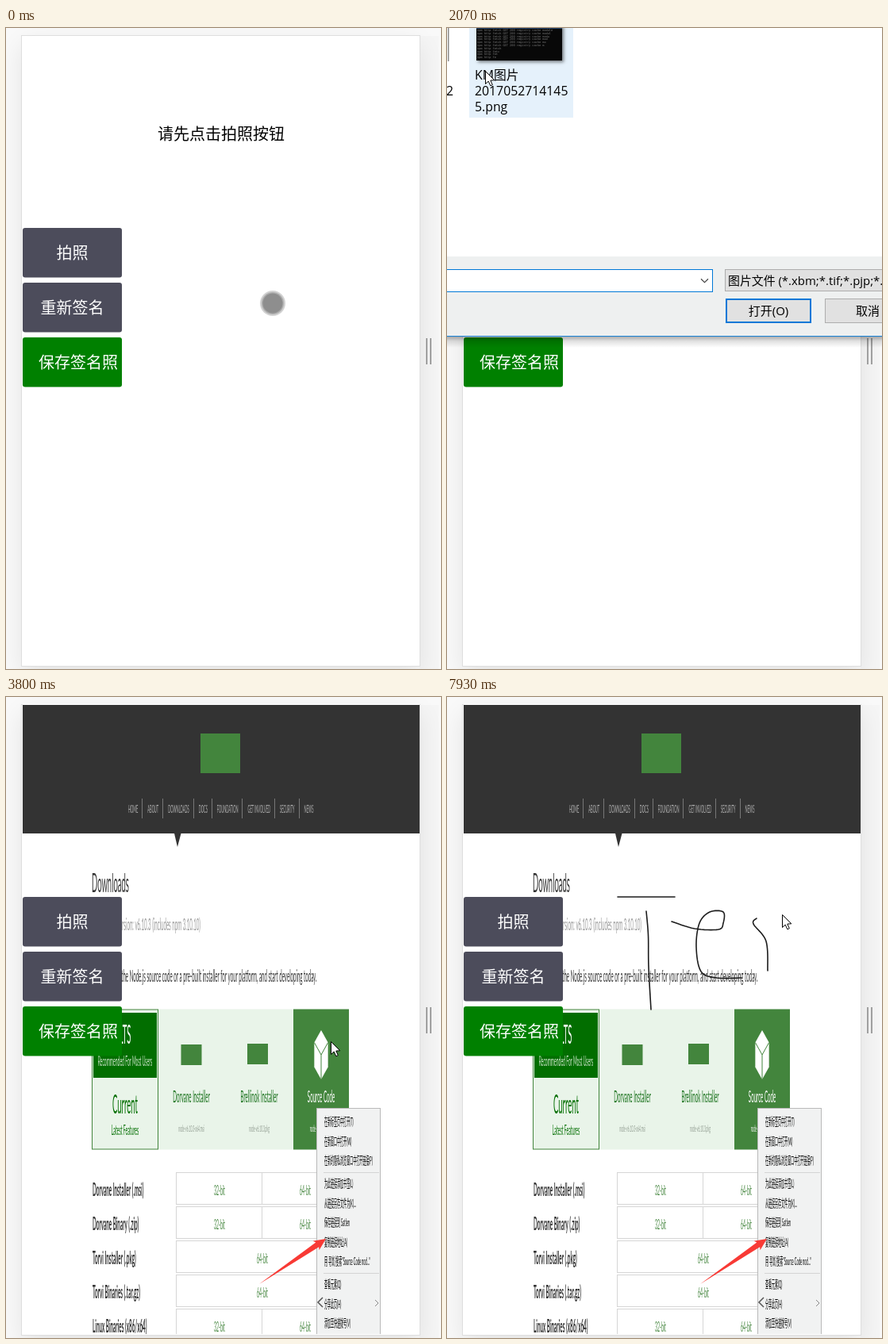
An HTML page with a canvas that plays this animation: 548 by 808 pixels, repeating every 8 s.

```html
<!DOCTYPE html>
<html lang="zh">
<head>
<meta charset="utf-8">
<title>签名照</title>
<style>
  html, body { margin: 0; width: 100%; height: 100%; overflow: hidden; background: #f9f9f9; }
  canvas { display: block; }
</style>
</head>
<body>
<canvas id="stage" width="548" height="808"></canvas>
<script>
const ctx = document.getElementById('stage').getContext('2d');
const LOOP = 8000;
const SQUEEZE = 0.287; // the chosen picture is squeezed sideways to fit the phone
const UI = '"Open Sans", "Noto Sans CJK SC", "Noto Sans CJK", sans-serif';
const CJK = '"Noto Sans CJK SC", "Noto Sans CJK", sans-serif';
const WEB = 'Lato, "Noto Sans CJK SC", "Noto Sans CJK", sans-serif';
const GREEN = '#43853d', DEEP = '#026e00', DARK = '#333333', PALE = '#e9f4e9', BLUE = '#0078d7';

// Every path starts where the one before it ended; pen paths leave ink.
const paths = [];
function glide(from, to, ...points) {
  const prev = paths[paths.length - 1];
  if (prev) points.unshift(prev.points[prev.points.length - 1]);
  paths.push({ from, to, points });
}
function write(from, to, ...points) {
  paths.push({ from, to, points, pen: true });
}

glide(0, 470, [336, 347], [63, 287]);
glide(530, 930, [290, 369]);
glide(1400, 2070, [48, 54]);
glide(2070, 2200, [-14, 40]);
glide(2730, 3450, [375, 352]);
glide(3600, 3830, [412, 442]);
glide(4130, 4470, [215, 252]);
write(4530, 4930, [215, 252], [287, 252]);
glide(4930, 5130, [251, 270]);
write(5200, 5600, [251, 270], [253.5, 300], [254, 340], [257, 394]);
glide(5600, 5800, [283, 283]);
write(6000, 6800, [283, 283], [312, 292], [342, 293], [348, 285], [348, 271], [331, 271],
  [318, 285], [314, 315], [320, 346], [340, 354], [371, 354]);
glide(6800, 7000, [390, 279]);
write(7200, 7600, [390, 279], [386, 286], [402, 308], [404, 345]);
glide(7600, 7930, [422, 274]);

function spline(a, b, c, d, u) {
  return b + 0.5 * u * (c - a + u * (2 * a - 5 * b + 4 * c - d + u * (3 * (b - c) + d - a)));
}

function along({ from, to, points }, t) {
  const last = points.length - 1;
  const s = Math.min(Math.max((t - from) / (to - from), 0), 1) * last;
  const i = Math.min(Math.floor(s), last - 1);
  const near = k => points[Math.min(Math.max(i + k, 0), last)];
  return [0, 1].map(k => spline(near(-1)[k], near(0)[k], near(1)[k], near(2)[k], s - i));
}

function pointer(t) {
  const begun = paths.filter(path => path.from <= t);
  return along(begun[begun.length - 1], t);
}

function box(x, y, w, h, fill, line, weight = 1) {
  ctx.fillStyle = line || fill;
  ctx.fillRect(x, y, w, h);
  if (!line) return;
  ctx.fillStyle = fill;
  ctx.fillRect(x + weight, y + weight, w - 2 * weight, h - 2 * weight);
}

function square(cx, cy, side, color) {
  box(cx - side / 2, cy - side / 2, side, side, color);
}

function text(str, x, y, size, color, align = 'left', family = UI) {
  ctx.font = size + 'px ' + family;
  ctx.fillStyle = color;
  ctx.textAlign = align;
  ctx.fillText(str, x, y);
}

// Returns the drawn width.
function webText(str, x, y, size, color, align = 'left', weight = '') {
  ctx.save();
  ctx.translate(x, y);
  ctx.scale(SQUEEZE, 1);
  ctx.font = `${weight} ${size}px ${WEB}`;
  ctx.fillStyle = color;
  ctx.textAlign = align;
  ctx.fillText(str, 0, 0);
  const width = ctx.measureText(str).width * SQUEEZE;
  ctx.restore();
  return width;
}

function trace(points) {
  ctx.beginPath();
  points.forEach(([x, y]) => ctx.lineTo(x, y));
}

function poly(points, fill) {
  trace(points);
  ctx.closePath();
  ctx.fillStyle = fill;
  ctx.fill();
}

function line(points, color, width) {
  trace(points);
  ctx.strokeStyle = color;
  ctx.lineWidth = width;
  ctx.stroke();
}

function chevron(x, y, size, turn, color, width) {
  ctx.save();
  ctx.translate(x, y);
  ctx.rotate(turn);
  line([[-size, -size / 2], [0, size / 2], [size, -size / 2]], color, width);
  ctx.restore();
}

function drawFrame() {
  box(0, 0, 548, 808, '#f9f9f9');
  ctx.save();
  ctx.shadowColor = 'rgba(0,0,0,.09)';
  ctx.shadowBlur = 30;
  ctx.shadowOffsetY = 12;
  box(20, 9, 501, 795, '#fff');
  ctx.restore();
  box(521, 10, 24, 798, 'rgba(0,0,0,.015)');
  box(19, 9, 503, 796, '#fff', '#dedede');
  box(529, 391, 2, 33, '#a0a0a0');
  box(534, 391, 2, 33, '#a0a0a0');
}

function drawButtons() {
  ['拍照', '重新签名', '保存签名照'].forEach((label, i) => {
    const y = 252 + 69 * i, save = i === 2;
    ctx.fillStyle = save ? '#008000' : '#4c4c5b';
    ctx.beginPath();
    ctx.roundRect(21, y, 125, 62.5, 3);
    ctx.fill();
    text(label, save ? 91 : 83.5, y + 39, 20, '#fff', 'center', CJK);
  });
}

function drawNav() {
  box(21, 10, 500, 162, DARK);
  poly([[212, 172], [220.5, 172], [216, 189]], DARK);
  square(270, 71, 50, GREEN);
  let x = 154;
  for (const label of 'HOME,ABOUT,DOWNLOADS,DOCS,FOUNDATION,GET INVOLVED,SECURITY,NEWS'.split(',')) {
    if (x > 154) box(Math.round(x - 7), 128, 1, 25, '#777');
    x += webText(label, x, 146, 14, '#b4b4b4') + 12;
  }
}

function drawTile(x, name, file, ink, note) {
  webText(name, x, 511, 21.5, ink, 'center');
  webText(file, x, 548, 11.7, note, 'center');
}

function drawTiles() {
  box(108, 393.5, 84, 177, PALE, GREEN);
  box(110, 398, 80, 82, DEEP);
  box(192, 393.5, 170, 177, PALE);
  box(362, 393.5, 70, 177, GREEN);
  webText('LTS', 150, 437, 33, '#fff', 'center');
  webText('Recommended For Most Users', 150, 465, 17.7, '#d5e8d2', 'center');
  webText('Current', 150, 525, 33, DEEP, 'center');
  webText('Latest Features', 150, 552, 18, DEEP, 'center');
  square(233.5, 451, 26, GREEN);
  square(317, 450, 26, GREEN);
  drawTile(233.5, 'Dorvane Installer', 'node-v6.10.3-x64.msi', '#17701a', '#8f9a8f');
  drawTile(319, 'Brellinok Installer', 'node-v6.10.3.pkg', '#17701a', '#8f9a8f');
  drawTile(397, 'Source Code', 'node-v6.10.3.tar.gz', '#fff', '#fff');

  const hexagon = [0, 1, 2, 3, 4, 5].map(k => k * Math.PI / 3)
    .map(a => [397 + 10 * Math.sin(a), 451 - 31 * Math.cos(a)]);
  poly(hexagon, '#fff');
  line([hexagon[5], [397, 451], hexagon[1]], GREEN, 1);
  line([[397, 451], hexagon[3]], GREEN, 1);
}

function drawTable() {
  const rows = ['Dorvane Installer (.msi)', 'Dorvane Binary (.zip)', 'Torvi Installer (.pkg)',
    'Torvi Binaries (.tar.gz)', 'Linux Binaries (x86/x64)'];
  rows.forEach((label, i) => {
    const y = 600 + 43 * i;
    const bit = (str, x) => webText(str, x, y + 28, 18, GREEN, 'center');
    webText(label, 109, y + 29, 22, DARK, 'left', 'bold');
    box(214, y - 1, 218, 41, '#fff', '#d6d6d6');
    if (label.startsWith('Torvi')) return bit('64-bit', 323);
    box(322, y, 1, 39, '#d6d6d6');
    bit('32-bit', 269);
    bit('64-bit', 377);
  });
}

function drawMenu() {
  const groups = [
    ['在新标签页中打开(T)', '在新窗口中打开(W)', '在新的隐私浏览窗口中打开链接(P)'],
    ['为此链接添加书签(L)', '从链接另存文件为(K)...', '保存链接到 Satlen', '复制链接地址(A)',
      '用 寻岚 搜索"Source Code nod..."'],
    ['查看元素(Q)', '分享此页(H)', '添加至快速拨号(V)']
  ];
  box(391, 518, 81, 290, '#f1f2f2', '#b9b9b9');
  let y = 540;
  groups.forEach((group, i) => {
    if (i) box(400, Math.round((y += 4.2) - 19.5), 70, 1, '#d4d4d4');
    for (const label of group) {
      webText(label, 401, y, 14, '#000');
      y += 24.6;
    }
  });
  chevron(396, 763, 6, Math.PI / 2, '#555', 1.5);
  chevron(467, 764, 4, -Math.PI / 2, '#888', 1);
}

function drawRedArrow(x0, y0, x1, y1) {
  const length = Math.hypot(x1 - x0, y1 - y0);
  ctx.save();
  ctx.translate(x1, y1);
  ctx.rotate(Math.atan2(y1 - y0, x1 - x0));
  poly([[-length, 0], [-13, -3.5], [-15, -7], [0, 0], [-15, 7], [-13, 3.5]], '#f83a35');
  ctx.restore();
}

function drawPicture() {
  ctx.save();
  ctx.beginPath();
  ctx.rect(21, 9, 500, 794);
  ctx.clip();
  box(21, 9, 500, 794, '#fff');
  drawNav();
  webText('Downloads', 108, 246, 33, DARK);
  webText('Latest LTS Version: v6.10.3 (includes npm 3.10.10)', 245, 294, 21.3, '#999', 'right');
  webText('Download the Node.js source code or a pre-built installer for your platform, and start developing today.',
    391.5, 359, 21.3, DARK, 'right');
  drawTiles();
  drawTable();
  drawMenu();
  drawRedArrow(319, 740, 403, 683);
  ctx.restore();
}

function drawFiles(t, [x, y]) {
  if (t >= 2800) box(0, 0, 15, 113, t >= 3470 ? '#d9d9d9' : '#cce8ff');
  else if (x < 15) box(0, 0, 15, 113, '#e5f1fb');
  if (x >= 28 && x < 159 && y < 113) box(28, 0, 131, 113, '#e5f1fb');
  box(0, 0, 1, 41, '#fff');
  box(1, 0, 1.5, 42, '#8a8a8a');
  text('2', 8, 85, 15.8, '#000', 'right');

  ctx.save();
  ctx.shadowColor = 'rgba(0,0,0,.5)';
  ctx.shadowBlur = 4;
  ctx.shadowOffsetX = ctx.shadowOffsetY = 1.5;
  box(37, -4, 108, 45, '#080808');
  ctx.restore();
  box(37, 0, 108, 1, '#24426b');
  const log = 'npm http fetch GET 200 registry cache modules ok';
  for (let i = 0; i < 10; i++) {
    const size = i < 6 ? 44 - i : 20 - i;
    text(log.slice(0, size), 38, 4 + i * 3.8, 3.6, '#777', 'left', '"DejaVu Sans Mono", monospace');
  }
  ['KM图片', '2017052714145', '5.png'].forEach((s, i) => text(s, 35, 65 + 20 * i, 15.8, '#000'));
}

function drawControls(t, [x, y]) {
  const picked = t >= 2800, pressed = t >= 3470;
  const over = x >= 351 && x < 459 && y >= 341 && y < 372;
  box(-2, 304, 337, 29, '#fff', picked ? '#7a7a7a' : BLUE);
  if (picked) text('KM图片20170527141220.png', 130, 324, 15.5, '#000', 'right');
  chevron(324.5, 318.5, 4.5, 0, '#444', 1.1);
  box(350, 304, 202, 28, '#e1e1e1', '#adadad');
  text('图片文件 (*.xbm;*.tif;*.pjp;*.jpg)', 354, 324, 14.9, '#000');
  if (pressed) box(351, 341, 108, 31, '#cce4f7', '#005499');
  else box(351, 341, 108, 31, over ? '#e5f1fb' : '#e1e1e1', BLUE, over ? 1 : 2);
  text('打开(O)', 405, 362, 15, '#000', 'center');
  box(476, 341, 80, 31, '#e1e1e1', '#adadad');
  text('取消', 515, 362, 15, '#000');
}

function drawDialog(t, at) {
  ctx.save();
  if (t < 1130) ctx.globalAlpha = 0.5;
  const shade = ctx.createLinearGradient(0, 389, 0, 403);
  shade.addColorStop(0, 'rgba(0,0,0,.32)');
  shade.addColorStop(0.4, 'rgba(0,0,0,.12)');
  shade.addColorStop(1, 'rgba(0,0,0,0)');
  box(0, 389, 548, 14, shade);
  box(0, 0, 548, 288, '#fff');
  box(0, 288, 548, 100, '#eef0f0');
  box(0, 388, 548, 1, '#1883d7');
  if (t < 1330) {
    box(0, 304, 335, 29, '#fff');
    box(350, 304, 198, 28, '#fff');
    box(350, 340, 110, 33, '#fff');
    box(475, 340, 73, 33, '#fff');
  } else {
    drawFiles(t, at);
    drawControls(t, at);
  }
  ctx.restore();
}

function drawInk(t) {
  ctx.save();
  ctx.lineJoin = ctx.lineCap = 'round';
  for (const path of paths.filter(p => p.pen && p.from < t)) {
    const end = Math.min(t, path.to), ink = [];
    for (let s = path.from; s < end; s += 10) ink.push(along(path, s));
    line([...ink, along(path, end)], '#1c1c1c', 1.6);
  }
  ctx.restore();
}

function drawTouch([x, y]) {
  const disc = (r, color) => {
    ctx.fillStyle = color;
    ctx.beginPath();
    ctx.arc(x, y, r, 0, 7);
    ctx.fill();
  };
  disc(16, '#d2d2d2');
  disc(14, '#adadad');
  disc(12.5, '#8e8e8e');
}

function drawArrow([x, y]) {
  ctx.save();
  ctx.translate(Math.round(x) + 0.5, Math.round(y) + 0.5);
  poly([[0, 0], [0, 16], [3.7, 12.6], [6.3, 18.3], [8.8, 17.2], [6.3, 11.6], [11.3, 11.3]], '#fff');
  ctx.strokeStyle = '#000';
  ctx.lineWidth = 1;
  ctx.stroke();
  ctx.restore();
}

function draw(t) {
  const at = pointer(t);
  drawFrame();
  if (t >= 3670) drawPicture();
  else text('请先点击拍照按钮', 271, 141, 20, '#000', 'center', CJK);
  drawButtons();
  drawInk(t);
  if (t >= 1070 && t < 3600) drawDialog(t, at);
  if (t < 530) drawTouch(at);
  else drawArrow(at);
}

function tick(t) {
  const stamp = k => Math.round(k * 20 / 3) * 10;
  const k = Math.round(t * 15 / 1000);
  return stamp(k) <= t ? stamp(k) : stamp(k - 1);
}

let shown = -1;
const begin = performance.now();
function loop() {
  const t = tick((performance.now() - begin) % LOOP);
  if (t !== shown) draw(shown = t);
  requestAnimationFrame(loop);
}
loop();
</script>
</body>
</html>
```
